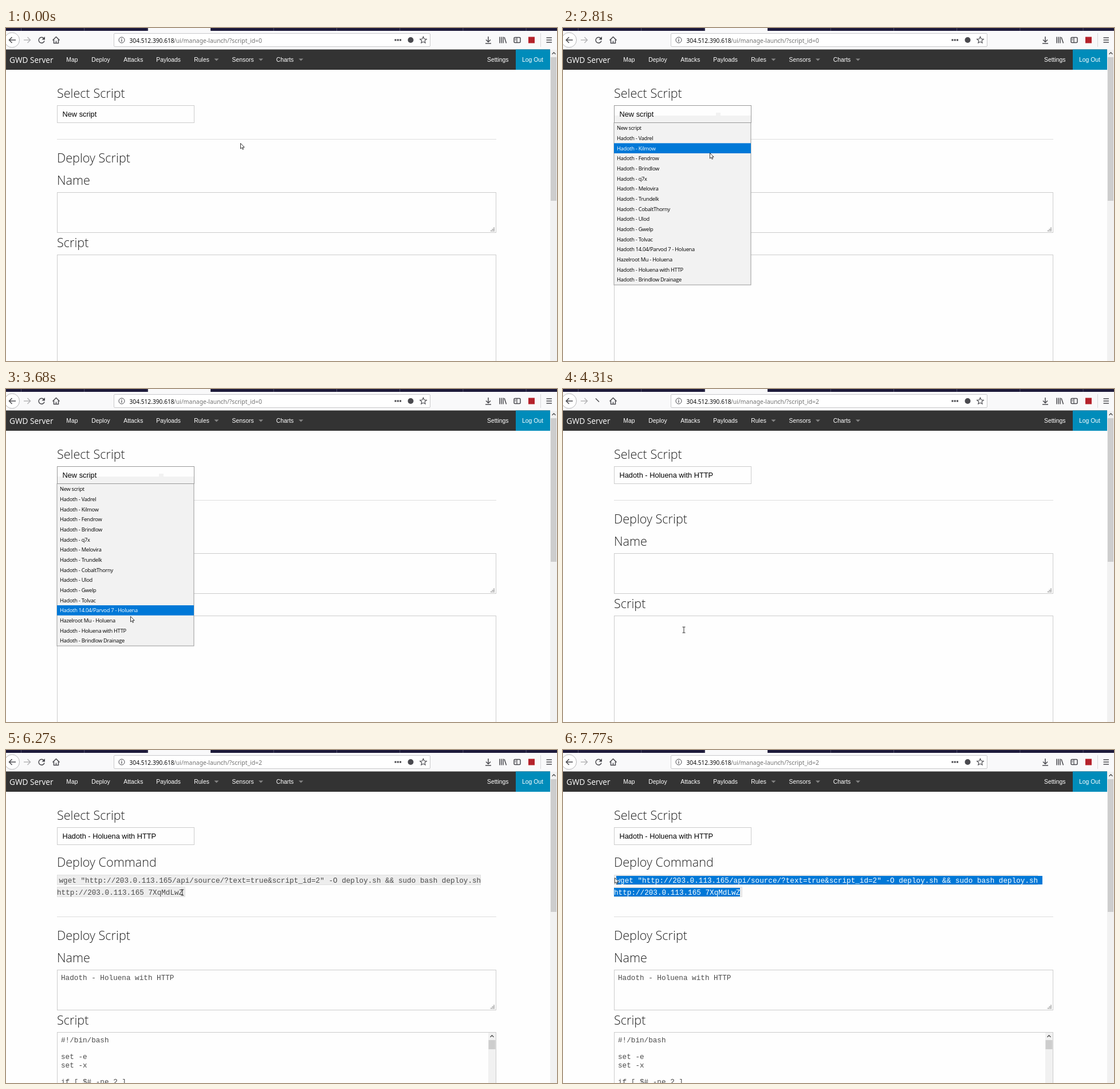
Animation of 962 by 582 pixels, one loop 8 s. Source, as an HTML page:

```html
<!DOCTYPE html>
<html lang="en">
<head>
<meta charset="utf-8">
<title>Deploy page</title>
<style>
html, body { margin: 0; width: 100%; height: 100%; overflow: hidden; background: #fefefe; }
svg { display: block; }
text { white-space: pre; }
.head { font: 300 21.6px "Open Sans", sans-serif; fill: #222; }
.nav { font: 10.4px "Liberation Sans", Arial, sans-serif; fill: #fff; }
.brand { font: 13.6px "Open Sans", sans-serif; fill: #fff; }
.pick { font: 12.8px "Liberation Sans", Arial, sans-serif; fill: #000; }
.mono { font: 12.66px "Liberation Mono", "Courier New", monospace; fill: #4a4a4a; }
.opt { font: 9.3px "Open Sans", sans-serif; letter-spacing: -.28px; fill: #000; }
.url { font: 10.2px "Noto Sans", sans-serif; fill: #0c0c0d; }
.path { font-size: 10.4px; fill: #737373; }
.box { fill: #fefefe; stroke: #ccc; }
.icon { fill: none; stroke: #4a4a4f; stroke-width: 1.5; }
.solid { fill: #4a4a4f; stroke: none; }
.code rect { fill: #ededed; stroke: #dfdfdf; }
.light text { fill: #fff; }
</style>
</head>
<body>
<svg width="962" height="582" viewBox="0 0 962 582">
  <defs>
    <clipPath id="marked">
      <rect id="clipHead" x="89" y="181" height="29"/>
      <rect id="clip1" y="220" height="15"/>
      <rect id="clip2" y="241" height="15"/>
    </clipPath>
    <g id="command">
      <text class="head" x="89" y="203.5">Deploy Command</text>
      <text class="mono" x="92.5" y="231.5">wget "http://203.0.113.165/api/source/?text=true&amp;script_id=2" -O deploy.sh &amp;&amp; sudo bash deploy.sh</text>
      <text class="mono" x="89" y="252.5">http://203.0.113.165 7XqMdLwZ</text>
    </g>
    <path id="grip" stroke="#aaa" stroke-width="2" stroke-dasharray="2 .5" d="M5 1h2M2.500 3.500h4.500M0 6h7"/>
    <path id="up" d="M-3 1.700L0-1.300 3 1.700" fill="none" stroke="#505050" stroke-width="1.400"/>
    <path id="drop" fill="#858585" d="M0 0h8l-4 4z"/>
  </defs>

  <rect width="962" height="582" fill="#fefefe"/>

  <!-- browser chrome -->
  <rect width="962" height="5" fill="#1d1a3a"/>
  <g id="tabs" fill="#4d4a66"></g>
  <rect x="248" width="109" height="6" fill="#f9f9fa"/>
  <rect y="5" width="962" height="33" fill="#f9f9fa"/>
  <circle cx="10.500" cy="21" r="13" fill="#fff" stroke="#b8b8ba"/>
  <g class="icon">
    <path d="M17 21H5.500M10.500 16L5.500 21l5 5"/>
    <path stroke="#b5b5b7" d="M31 21h11.500M37.500 16l5 5-5 5"/>
    <g id="reload"><path d="M66 18A5 5 0 1 0 67 22.500"/><path class="solid" d="M68 15v5.500h-5.500z"/></g>
    <path id="busy" d="M57 16.500l6 6"/>
    <path d="M81.500 21.500l6-6 6 6M83.500 20.500v6h8v-6M87.500 26.500v-4"/>
    <rect x="188.500" y="9.500" width="552" height="23" rx="1.500" fill="#fff" stroke="#c9c9cb" stroke-width="1"/>
    <circle cx="202" cy="21" r="5" stroke-width="1"/>
    <path stroke-width="1.200" d="M202 20v4M202 18v1.200"/>
    <path stroke-width="3" stroke-dasharray="3 1.300" d="M678.500 21h12"/>
    <circle class="solid" cx="706.500" cy="21" r="5"/>
    <path id="star" stroke-width="1.200"/>
    <path d="M842 15v9M838 20.500l4 4 4-4M837 27h10"/>
    <path d="M862 15.500v11M865 15.500v11M868 15.500v11M870 16l3.500 10.500"/>
    <rect x="887" y="16.500" width="11" height="9" rx="1.500"/>
    <path d="M892 17v8M888.500 19h2M888.500 21h2" stroke-width="1.200"/>
    <path stroke="#d7d7db" stroke-width="1" d="M933.500 9v24"/>
    <path d="M943.500 17h9.500M943.500 21h9.500M943.500 25h9.500"/>
  </g>
  <rect x="912" y="15.500" width="11" height="11" fill="#b5222b"/>
  <text class="url" x="215.500" y="25.500">304.512.390.618</text>
  <text class="url path" x="293" y="25.500">/ui/manage-launch/?script_id=<tspan id="scriptId">0</tspan></text>

  <!-- navigation -->
  <rect y="37.500" width="950" height="35.500" fill="#333"/>
  <rect x="890" y="37.500" width="60" height="35.500" fill="#008cba"/>
  <text class="brand" x="6" y="60.500">GWD Server</text>
  <g id="nav" class="nav"></g>
  <use href="#drop" x="363.500" y="53.500"/>
  <use href="#drop" x="441" y="53.500"/>
  <use href="#drop" x="511" y="53.500"/>
  <rect x="950" y="38" width="12" height="544" fill="#f1f1f1"/>
  <use href="#up" x="956.500" y="44"/>
  <rect id="thumb" x="951" y="51" width="10" height="251" fill="#cdcdcd"/>

  <!-- page -->
  <text class="head" x="89" y="122">Select Script</text>
  <rect id="select" class="box" x="89.500" y="135.500" width="239" height="30"/>
  <path id="shade" fill="#f2f2f2" d="M90 153h238v12H90zM267 148h8v5h-8z"/>
  <text id="choice" class="pick" x="98.500" y="155"></text>

  <g id="result">
    <g class="code">
      <rect x="89.500" y="218.500" width="739" height="17"/>
      <rect x="89.500" y="239.500" width="223" height="17"/>
    </g>
    <use href="#command"/>
    <g clip-path="url(#marked)" class="light">
      <rect x="80" y="175" width="780" height="90" fill="#0078d7"/>
      <g id="whiteText"></g>
    </g>
  </g>

  <g id="lower">
    <path stroke="#ddd" d="M89 194.500h767"/>
    <text class="head" x="89" y="235">Deploy Script</text>
    <text class="head" x="89" y="273.500">Name</text>
    <rect class="box" x="89.500" y="287.500" width="766" height="70"/>
    <use href="#grip" x="846" y="348.500"/>
    <text class="head" x="89" y="383">Script</text>
    <rect class="box" x="89.500" y="396.500" width="766" height="300"/>
    <g id="filled" class="mono">
      <text x="96" y="304.500">Hadoth - Holuena with HTTP</text>
      <text x="96" y="413.500">#!/bin/bash</text>
      <text x="96" y="443">set -e</text>
      <text x="96" y="457.500">set -x</text>
      <text x="96" y="486.500">if [ $# -ne 2 ]</text>
      <rect x="842" y="397" width="13" height="200" fill="#f1f1f1"/>
      <use href="#up" x="848.500" y="403"/>
      <rect x="842.500" y="410" width="12" height="16" fill="#cdcdcd"/>
    </g>
  </g>

  <g id="menu">
    <rect x="89" y="165.500" width="239" height="283.500" fill="#f2f2f2" stroke="#999"/>
    <rect id="bar" x="89" width="239" height="17.670" fill="#0078d7"/>
    <g id="options"></g>
  </g>

  <path id="arrow" fill="#fff" stroke="#222" stroke-width=".9" d="M.5.5v9.500l2.200-2 1.500 3.300 1.500-.7-1.500-3.200h3z"/>
  <path id="beam" fill="none" stroke="#333" d="M-2.500-5h5M0-5v10M-2.500 5h5"/>
</svg>

<script>
const $ = id => document.getElementById(id);
const LOOP = 8000, STEP = 120, ROW = 17.67;
const OPEN = 2070, PICKED = 4160, LOADED = 4550;

const os = 'Hadoth - ';
const options = ['New script',
  ...['Vadrel', 'Kilmow', 'Fendrow', 'Brindlow', 'q7x', 'Melovira', 'Trundelk', 'CobaltThorny', 'Ulod', 'Gwelp', 'Tolvac'].map(n => os + n),
  'Hadoth 14.04/Parvod 7 - Holuena', 'Hazelroot Mu - Holuena',
  os + 'Holuena with HTTP', os + 'Brindlow Drainage'];

// start time, number of steps, end x, end y
const legs = [
  [0, 1, 409, 201], [500, 2, 378, 224], [740, 2, 420, 208], [1110, 7, 268, 148],
  [2810, 3, 231, 357], [3170, 1, 225, 368], [3320, 7, 211, 419], [4160, 1, 211, 421],
  [4430, 6, 275, 205], [5150, 1, 226, 284], [5270, 2, 315, 270], [5540, 4, 313, 243],
  [6270, 1, 308, 249], [6420, 3, 86, 215], [6780, 1, 80, 217], [6900, 3, 102, 229], [7290, 5, 90, 223]
];
// start time, highlighted row
const rows = [[0, 0], [2810, 2], [2930, 6], [3050, 9], [3170, 11], [3560, 12], [3800, 13], [3920, 14]];
// start time, left edge on each line, heading included
const marks = [[0, 837, 309, 0], [6420, 837, 234, 0], [6540, 160, 89, 0], [6660, 93, 89, 1], [7020, 93, 89, 0]];

const at = (list, t) => list.findLast(k => k[0] <= t);
const show = (id, on) => $(id).style.display = on ? '' : 'none';
const set = (id, attrs) => { for (const k in attrs) $(id).setAttribute(k, attrs[k]); };
const between = (t, a, b) => t >= a && t < b;

function pointer(t) {
  const leg = at(legs, t), [start, steps, x, y] = leg;
  const [, , x0, y0] = legs[Math.max(0, legs.indexOf(leg) - 1)];
  const p = Math.min(1, (Math.floor((t - start) / STEP) + 1) / steps);
  return [x0 + (x - x0) * p, y0 + (y - y0) * p].map(Math.round);
}

function add(parent, tag, attrs, text = '') {
  const el = document.createElementNS('http://www.w3.org/2000/svg', tag);
  for (const k in attrs) el.setAttribute(k, attrs[k]);
  el.textContent = text;
  return $(parent).appendChild(el);
}

for (let i = 0; i < 9; i++) add('tabs', 'rect', { x: 26 + 110.2 * i, width: 1, height: 5 });
const links = { Map: 105.3, Deploy: 149.3, Attacks: 205.3, Payloads: 262.3, Rules: 328.3, Sensors: 394.5, Charts: 471.7, Settings: 840, 'Log Out': 901 };
for (const name in links) add('nav', 'text', { x: links[name], y: 59 }, name);
const labels = options.map((name, i) => add('options', 'text', { class: 'opt', x: 94, y: 178.3 + ROW * i }, name));
for (const el of $('command').children) $('whiteText').append(el.cloneNode(true));

const tips = Array.from({ length: 10 }, (_, i) => {
  const r = i % 2 ? 2.8 : 6, a = Math.PI * (i / 5 - .5);
  return [728.5 + r * Math.cos(a), 21.3 + r * Math.sin(a)];
});
set('star', { d: 'M' + tips.join('L') + 'z' });

function draw(t) {
  const open = between(t, OPEN, PICKED), hover = between(t, 1590, PICKED), loaded = t >= LOADED;

  $('select').style.fill = hover && !open ? '#f2f2f2' : '#fefefe';
  $('select').style.stroke = hover ? '#999' : '#ccc';
  $('choice').textContent = t < PICKED ? options[0] : options[14];
  show('shade', open);
  show('menu', open);
  const row = at(rows, t)[1];
  set('bar', { y: 166 + ROW * row });
  labels.forEach((el, i) => el.style.fill = i === row ? '#fff' : '');

  const busy = between(t, PICKED, LOADED);
  show('reload', !busy);
  show('busy', busy);
  $('scriptId').textContent = t < 4310 ? 0 : 2;
  show('result', loaded);
  show('filled', loaded);
  set('lower', { transform: `translate(0 ${loaded ? 97 : 0})` });
  set('thumb', { height: loaded ? 232 : 251 });

  const [, first, second, heading] = at(marks, t);
  set('clipHead', { width: heading * 172 });
  set('clip1', { x: first, width: 837 - first });
  set('clip2', { x: second, width: 309 - second });

  const beam = busy || between(t, 6270, 6540);
  show('arrow', !beam);
  show('beam', beam);
  set(beam ? 'beam' : 'arrow', { transform: `translate(${pointer(t)})` });
}

const start = performance.now();
function tick() {
  draw((performance.now() - start) % LOOP);
  requestAnimationFrame(tick);
}
tick();
</script>
</body>
</html>
```
